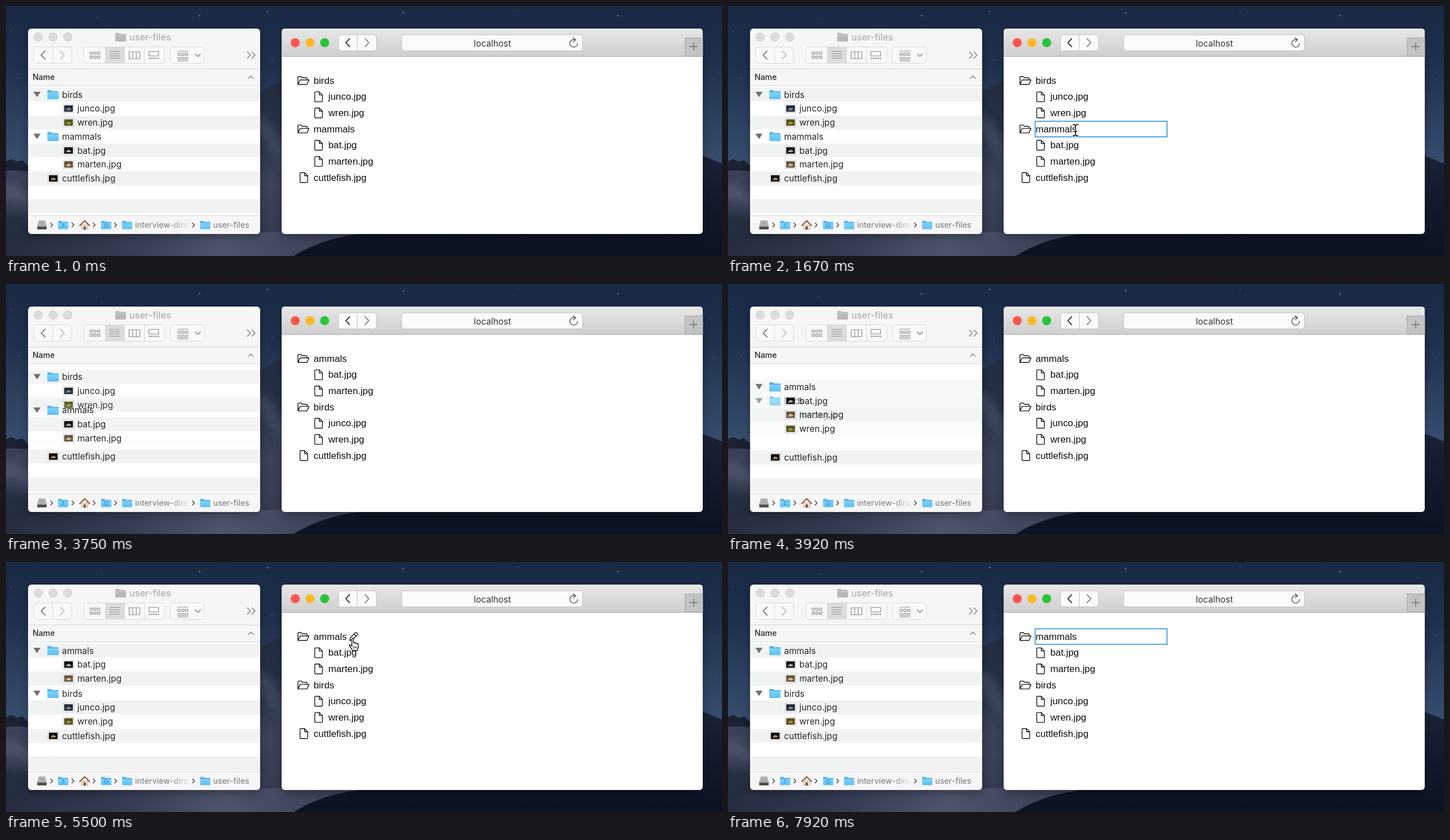
Animation of 1265x443 px, one loop 8000 ms. Source, as an HTML page:

```html
<!DOCTYPE html>
<html lang="en">
<head>
<meta charset="utf-8">
<title>Folder sync</title>
<style>
  html, body { margin: 0; width: 100%; height: 100%; overflow: hidden; background: #1b2a48; }
  svg { display: block; }
  text { font-family: Inter, "Open Sans", sans-serif; white-space: pre; }
  #list text { font: 16.8px "Liberation Sans", Arial, sans-serif; fill: #0c0c0c; }
  #list path { fill: none; stroke: #161616; stroke-width: 1.4; stroke-linejoin: round; stroke-linecap: round; }
  #finder text { font-size: 15.4px; fill: #262626; }
  #crumbs text { font-size: 14.3px; fill: #777; }
  .line { fill: none; stroke-linecap: round; stroke-linejoin: round; }
</style>
</head>
<body>
<svg id="stage" width="1265" height="443" viewBox="0 0 1265 443">
  <defs>
    <linearGradient id="sky" x2="0" y2="1">
      <stop offset="0" stop-color="#1a2944"/><stop offset=".25" stop-color="#20324f"/>
      <stop offset=".62" stop-color="#384d6d"/>
    </linearGradient>
    <linearGradient id="sand" x2="0" y2="1">
      <stop offset="0" stop-color="#222b3e"/><stop offset=".35" stop-color="#29324a"/>
      <stop offset=".6" stop-color="#3c435a"/><stop offset="1" stop-color="#32384d"/>
    </linearGradient>
    <linearGradient id="floor">
      <stop offset="0" stop-color="#272d40"/><stop offset=".35" stop-color="#3a4056"/>
      <stop offset=".6" stop-color="#535a6f"/><stop offset="1" stop-color="#363c53"/>
    </linearGradient>
    <linearGradient id="dark" x2="0" y2="1">
      <stop offset="0" stop-color="#1a2235"/><stop offset="1" stop-color="#0b1221"/>
    </linearGradient>
    <linearGradient id="bar" x2="0" y2="1">
      <stop offset="0" stop-color="#e7e7e7"/><stop offset="1" stop-color="#cfcfcf"/>
    </linearGradient>
    <linearGradient id="blue" x2="0" y2="1">
      <stop offset="0" stop-color="#7fd2fb"/><stop offset="1" stop-color="#5fbff2"/>
    </linearGradient>
    <linearGradient id="fade" gradientUnits="userSpaceOnUse" x1="290" x2="326" y1="0" y2="0">
      <stop offset="0" stop-color="#777"/><stop offset="1" stop-color="#777" stop-opacity="0"/>
    </linearGradient>
    <filter id="soft" x="-50%" y="-50%" width="200%" height="200%"><feGaussianBlur stdDeviation="7"/></filter>
    <filter id="shadow"><feDropShadow dx="0" dy="5" stdDeviation="8" flood-opacity=".32"/></filter>
    <clipPath id="rows"><rect x="39" y="142" width="410" height="229"/></clipPath>
  </defs>

  <rect width="1265" height="443" fill="url(#sky)"/>
  <g id="stars" fill="#c3cee0"></g>
  <path d="M0 275L9 271 20 276 28 273 39 283 90 292V330H0z" fill="#1a2233"/>
  <path d="M0 292C30 288 60 300 120 290S340 190 449 151C480 138 520 110 560 112L700 443H0z" fill="url(#sand)"/>
  <g filter="url(#soft)">
    <path d="M430 185C455 190 475 210 500 260L500 300C470 260 450 225 430 215z" fill="#4a536b" opacity=".55"/>
    <path d="M-10 315C20 312 40 330 60 350V372C35 350 15 340 -10 342z" fill="#525a70" opacity=".7"/>
    <path d="M-20 365C60 370 190 400 250 460H-20z" fill="#222a3c" opacity=".8"/>
  </g>
  <path d="M0 425C30 405 110 398 190 402L640 400 600 443H0z" fill="url(#floor)" opacity=".85"/>
  <path d="M508 443C540 424 575 409 640 402L1160 300C1190 262 1215 258 1235 267L1265 279V443z" fill="url(#dark)"/>

  <g filter="url(#shadow)">
    <rect x="39" y="40" width="410" height="364" rx="6" fill="#f6f6f6"/>
    <rect x="487" y="40" width="744" height="364" rx="6" fill="#fff"/>
  </g>

  <g id="finder">
    <g fill="#dcdcdc" stroke="#cacaca"><circle cx="57" cy="55" r="7.4"/><circle cx="83" cy="55" r="7.4"/><circle cx="109" cy="55" r="7.4"/></g>
    <path d="M193 62V49q0-1.500 1.500-1.500h5l2 2h9q1.500 0 1.500 1.500V62q0 1-1 1H194q-1 0-1-1z" fill="#b9b9b9"/>
    <path d="M193 52.500h19" stroke="#cfcfcf"/>
    <text x="218" y="61" style="font-size:16.5px;fill:#a3a3a3">user-files</text>
    <g fill="#f9f9f9" stroke="#d9d9d9">
      <rect x="49" y="72.500" width="67" height="29" rx="5"/><rect x="137.500" y="72.500" width="143" height="29" rx="5"/>
      <rect x="290.500" y="72.500" width="60" height="29" rx="5"/>
      <path d="M82.500 73v28M209.500 73v28M244.500 73v28"/>
    </g>
    <rect x="175" y="73" width="34.500" height="28" fill="#dcdcdc"/>
    <g class="line" stroke="#9b9b9b" stroke-width="1.800">
      <path d="M69 80l-7 7 7 7" stroke="#858585"/><path d="M96 80l7 7-7 7" stroke="#c4c4c4"/>
      <path d="M334.500 85l4.500 4.500 4.500-4.500M426.500 81.500l5.500 5.500-5.500 5.500M434.500 81.500l5.500 5.500-5.500 5.500"/>
      <path d="M428 128.500l4.500-4.500 4.500 4.500" stroke="#8b8b8b" stroke-width="1.500"/>
    </g>
    <g id="tools" class="line" stroke="#8e8e8e" stroke-width="1.200">
      <path d="M183.500 80.500h17M183.500 84.500h17M183.500 88.500h17M183.500 92.500h17"/>
      <path d="M217.500 81h19v12.500h-19zM223.800 81v12.500M230.200 81v12.500M252.500 80.500h17v8h-17z"/>
    </g>
    <path d="M39 111.500h410M39 141.500h410" stroke="#d4d4d4"/>
    <text x="47" y="131.300" style="font-size:14px;font-weight:500">Name</text>
    <rect x="39" y="142" width="410" height="229" fill="#fff"/>
    <g id="rows-box" clip-path="url(#rows)"></g>
    <path d="M39 371.500h410" stroke="#d6d6d6"/>
    <g id="crumbs"></g>
  </g>

  <g id="browser">
    <path d="M487 89V46q0-6 6-6H1225q6 0 6 6V89z" fill="url(#bar)"/>
    <path d="M1199.500 89V56.500H1231V89z" fill="#c3c3c3" stroke="#a9a9a9"/>
    <path d="M487 89.500h744" stroke="#adadad"/>
    <path d="M1208 72h14M1215 65v14" stroke="#707070" stroke-width="1.400"/>
    <circle cx="511" cy="65" r="8" fill="#fc5650"/><circle cx="537" cy="65" r="8" fill="#fdb927"/><circle cx="563" cy="65" r="8" fill="#2ac43b"/>
    <g fill="#fbfbfb" stroke="#c1c1c1">
      <rect x="587.500" y="51" width="67" height="28.500" rx="5"/><path d="M620.500 51v28.500"/>
      <rect x="699" y="51" width="319.500" height="28.500" rx="5"/>
    </g>
    <g class="line" stroke-width="2"><path d="M607 58l-6.500 7 6.500 7" stroke="#424242"/><path d="M634.500 58l6.500 7-6.500 7" stroke="#919191"/></g>
    <path d="M1006 60a6.800 6.800 0 1 0 3.800 6.100M1002 56l4.500 4-4.500 3.500" class="line" stroke="#555" stroke-width="1.400"/>
    <text x="826.500" y="71.500" font-size="15.4" fill="#333">localhost</text>
    <g id="list"></g>
  </g>
  <g id="cursor"></g>
</svg>

<script>
const $ = id => document.getElementById(id);
const LOOP = 8000, PITCH = 24.75, ROW = 28.63;

// ---- static decoration ----
$('stars').innerHTML = [[342, 17], [462, 10], [702, 12], [1081, 17], [23, 128], [9, 45], [470, 95], [1250, 130], [160, 22], [905, 9]]
  .map(([x, y], i) => `<circle cx="${x}" cy="${y}" r="${i < 4 ? .9 : .5}"/>`).join('');

const grid = (x, y, cols, rows, dx, dy, w, h) => {
  let d = '';
  for (let r = 0; r < rows; r++) for (let c = 0; c < cols; c++)
    d += `M${x + c * dx} ${y + r * dy}h${w}v${h}h${-w}z`;
  return `<path d="${d}"/>`;
};
$('tools').innerHTML += grid(148.5, 81.5, 3, 2, 6.6, 7.2, 4, 4) + grid(253, 92, 5, 1, 3.9, 0, 1.3, 1.3) +
  grid(304, 83.5, 3, 2, 6.6, 7.5, 4, 4) + '<path d="M303.500 80h18M303.500 97.500h18"/>';

const folder = (x, y, w = 20) => `<g transform="translate(${x} ${y}) scale(${w / 20})">
  <path d="M0-6.500q0-1.500 1.500-1.500h5l2 2h10q1.500 0 1.500 1.500V7q0 1-1 1H1q-1 0-1-1z" fill="#53b4e6"/>
  <path d="M0-4H20V7q0 1-1 1H1q-1 0-1-1z" fill="url(#blue)"/></g>`;

const crumbSep = [81, 118.5, 156, 194, 331.5].map(x => `M${x - 2} 384.500l3.500 3.500-3.500 3.500`).join('');
$('crumbs').innerHTML = `
  <path d="M58 380h11l3 11v4q0 1-1 1H56q-1 0-1-1v-4z" fill="#8b8b8b"/><path d="M58 380h11l2.500 10h-16z" fill="#b2b2b2"/>
  <path d="M55.500 391.500h16v4h-16z" fill="#494949"/><path d="M61 383l4 4" stroke="#777"/>
  ${[92, 168, 205, 343].map(x => folder(x, 388, 18)).join('')}
  <circle cx="101" cy="387" r="1.800" fill="#3d9fd4"/><path d="M98 392q3-4 6 0z" fill="#3d9fd4"/>
  <circle cx="177" cy="389" r="3" fill="none" stroke="#3d9fd4" stroke-width="1.400"/>
  <path d="M133.500 388h11v8h-11z" fill="#eee3d0" stroke="#a79b8b" stroke-width=".7"/>
  <path d="M130.500 389l8.500-8.500 8.500 8.500" class="line" stroke="#98583d" stroke-width="2.200"/>
  <path d="M137 390.500h4v5.500h-4z" fill="#77543a"/>
  <path d="${crumbSep}" class="line" stroke="#555" stroke-width="1.700"/>
  <text x="228" y="393" style="fill:url(#fade)">interview-dire</text>
  <text x="366" y="393">user-files</text>`;

// ---- file browser window ----
const thumbs = {
  junco: ['#222a38', '#7d8793'], wren: ['#55551f', '#a29050'], bat: ['#0b0b0d', '#a9a9a9'],
  marten: ['#625646', '#e0b883'], cuttlefish: ['#090909', '#ae8a57']
};
const thumb = (name, x, y) => {
  const [back, blob] = thumbs[name];
  return `<rect x="${x}" y="${y - 7.5}" width="19" height="15" fill="#fff" stroke="#bdbdbd" stroke-width=".8"/>
    <rect x="${x + 1.8}" y="${y - 5.7}" width="15.400" height="11.400" fill="${back}"/>
    <path d="M${x + 5} ${y + 2}q3-5 6-3t4 2q-3 3-6 2t-4 1z" fill="${blob}"/>`;
};
const stripe = (y, cls = '') =>
  `<rect class="${cls}" x="39" y="${y - 12.4}" width="410" height="24.800" fill="#f1f3f3"/>`;
const label = (x, y, s, id = '') => `<text id="${id}" x="${x}" y="${y + 5.6}">${s}</text>`;

const group = (id, name, files, y) => {
  const lines = files.map((f, i) => {
    const fy = y + (i + 1) * PITCH;
    return thumb(f, 101, fy) + label(126, fy, f + '.jpg');
  }).join('');
  return `<g id="${id}">${[0, 1, 2].map(i => stripe(y + i * PITCH, i % 2 ? 'odd' : 'even')).join('')}
    <path d="M48.500 ${y - 5}h12.500l-6.200 9.500z" fill="#6f6f6f"/>${folder(73, y)}
    ${label(99, y, name, id + '-name')}${lines}</g>`;
};
const tailY = 157 + 6 * PITCH;
$('rows-box').innerHTML = group('birds', 'birds', ['junco', 'wren'], 157) +
  group('mammals', 'mammals', ['bat', 'marten'], 157 + 3 * PITCH) +
  `<g id="tail">${stripe(tailY)}${stripe(tailY + 2 * PITCH - .5)}${thumb('cuttlefish', 74, tailY)}${label(99, tailY, 'cuttlefish.jpg')}</g>`;

// share of the reorder finished at each redraw
const sortSteps = [[3750, .1], [3830, .34], [3920, .66], [4000, .87], [4080, .97], [4150, 1]];

function drawFinder(t) {
  const p = sortSteps.reduce((v, [at, share]) => t >= at ? share : v, 0);
  const shift = (id, dy) => $(id).setAttribute('transform', `translate(0 ${dy * p})`);
  shift('birds', 76); shift('mammals', -74.25); shift('tail', 2.6);
  const shade = (id, even) => document.querySelectorAll(`#${id} rect.even, #${id} rect.odd`)
    .forEach(r => r.setAttribute('opacity', r.classList.contains('even') ? even : 1 - even));
  shade('birds', 1 - p); shade('mammals', p);
  $('mammals-name').textContent = t < 3750 ? 'mammals' : 'ammals';
}

// ---- web page ----
const pen = document.createElement('canvas').getContext('2d');
pen.font = '16.8px "Liberation Sans", Arial, sans-serif';
const rowY = i => 132 + i * ROW;

const pageIcon = (x, y) => `<path d="M${x - 5} ${y - 8.500}h6.500l5.500 5.500v10.500q0 1.500-1.500 1.500h-10.500q-1.500 0-1.500-1.500v-14.500q0-1.500 1.500-1.500zM${x + 1.5} ${y - 8.5}v5.500h5.500"/>`;
const openIcon = y => `<path d="M515.800 ${y + 7}v-12.500q0-1.500 1.500-1.500h4.200l2.300 2.300h6.700q1.500 0 1.500 1.500v2.200M515.800 ${y + 7}l4-8h15.500l-3.600 8z"/>`;
const pencil = (x, y) => `<path d="M${x} ${y + 7}l1-4.700 8.700-8.700q1.400-1.200 2.700 0l1 1q1.200 1.300 0 2.600l-8.700 8.700zM${x + 7.6} ${y - 4.3}l3.700 3.700"/>`;

function pageRows(t) {
  const beast = t >= 3170 && t < 7330 ? 'ammals' : 'mammals';
  const a = [['birds', 0], ['junco.jpg', 2], ['wren.jpg', 2]];
  const b = [[beast, 0], ['bat.jpg', 2], ['marten.jpg', 2]];
  return [...(t < 3750 ? [...a, ...b] : [...b, ...a]), ['cuttlefish.jpg', 1]];
}

let lastList = '';
function drawPage(t, cur) {
  const editRow = t >= 1670 && t < 3750 ? 3 : t >= 5670 ? 0 : -1;
  let overPencil = false;
  const html = pageRows(t).map(([name, kind], i) => {
    const y = rowY(i), x = kind === 2 ? 569.5 : 543.5;
    let s = kind ? pageIcon(kind === 2 ? 552 : 526, y) : openIcon(y);
    if (i === editRow) {
      s += `<rect x="542.600" y="${y - 13.6}" width="233" height="27.500" fill="#fff" stroke="#2a92dc" stroke-width="1.600"/>`;
      if (t >= 2420 && t < 3170 && cur.x < 550)
        s += `<rect x="544" y="${y - 10}" width="14" height="19.500" fill="#a9d2fd"/>`;
    }
    s += `<text x="${x}" y="${y + 5.8}">${name}</text>`;
    if (editRow < 0 && cur.shape && Math.abs(cur.y - y) <= ROW / 2) {
      const px = x + pen.measureText(name).width + 5;
      overPencil = cur.x >= px && cur.x <= px + 16 && cur.y < y + 10;
      s += pencil(px, y);
    }
    return s;
  }).join('');
  if (html !== lastList) $('list').innerHTML = lastList = html;
  return overPencil;
}

// ---- pointer ----
const beam = 'M-4.500-10q4.500 0 4.500 3.500V6.500q0 3.500-4.500 3.500M4.500-10q-4.500 0-4.500 3.500M4.500 10q-4.500 0-4.500-3.500M-2.500 2.500h5';
const shapes = {
  arrow: '<path d="M0 0V18.500l4.300-4 3.200 7.300 3.300-1.400-3.200-7H13.400z" fill="#000" stroke="#fff" stroke-width="1.200"/>',
  hand: '<path d="M-2 1c0-2 3-2 3 0V8c.6-1.400 3-1 3 .6 .8-1.200 2.800-.6 2.900.9 1-.9 2.400-.2 2.400 1.300v4.600c0 2-1.600 3-1.600 6h-9c0-2.600-3.400-4.600-5-8.200-.8-1.800.8-2.600 2-1.600l2.300 2z" fill="#fff" stroke="#000" stroke-width="1.300"/><path d="M.8 14v4M3.500 14v4M6 14v4" stroke="#000"/>',
  beam: `<path d="${beam}" class="line" stroke="#fff" stroke-width="3.400"/><path d="${beam}" class="line" stroke="#000" stroke-width="1.500"/>`
};
// start, end, steps, from x y, to x y, shape
const moves = [
  [420, 830, 5, 652, 396, 624, 220, 'arrow'],
  [830, 1420, 1, 624, 220, 623, 220, 'arrow'],
  [1670, 1920, 3, 614, 220, 557, 218, 'beam'],
  [2070, 2170, 1, 558, 218, 557, 218, 'beam'],
  [2420, 2570, 2, 550, 218, 524, 217.5, 'beam'],
  [3170, 3170, 1, 0, 0, 0, 0, ''],
  [4830, 5580, 9, 560, 204, 615, 133, 'arrow'],
  [5670, 5920, 1, 615, 133, 615, 132, 'hand'],
  [5920, 5920, 1, 615, 132, 615, 132, 'beam'],
  [6080, 6250, 2, 596, 132, 548, 132, 'beam'],
  [6250, 6580, 4, 548, 132, 546, 132, 'beam'],
  [7080, 7170, 1, 547, 132, 548, 132, 'beam'],
  [7330, 7330, 1, 0, 0, 0, 0, '']
];
function pointer(t) {
  const m = moves.filter(v => v[0] <= t).pop();
  if (!m) return { x: 0, y: 0, shape: '' };
  const [a, b, n, x0, y0, x1, y1, shape] = m;
  const q = b > a ? Math.min(1, Math.floor((t - a) / (b - a) * n + .05) / n) : 1;
  const p = q * q * (3 - 2 * q);
  return { x: x0 + (x1 - x0) * p, y: y0 + (y1 - y0) * p, shape };
}

let lastShape = '';
function draw(t) {
  const cur = pointer(t);
  drawFinder(t);
  const over = drawPage(t, cur);
  const shape = over ? 'hand' : cur.shape;
  if (shape !== lastShape) $('cursor').innerHTML = shapes[shape] || '';
  lastShape = shape;
  $('cursor').setAttribute('transform', `translate(${cur.x} ${cur.y})`);
}

const start = performance.now();
(function tick() {
  draw((performance.now() - start) % LOOP);
  requestAnimationFrame(tick);
})();
</script>
</body>
</html>
```
